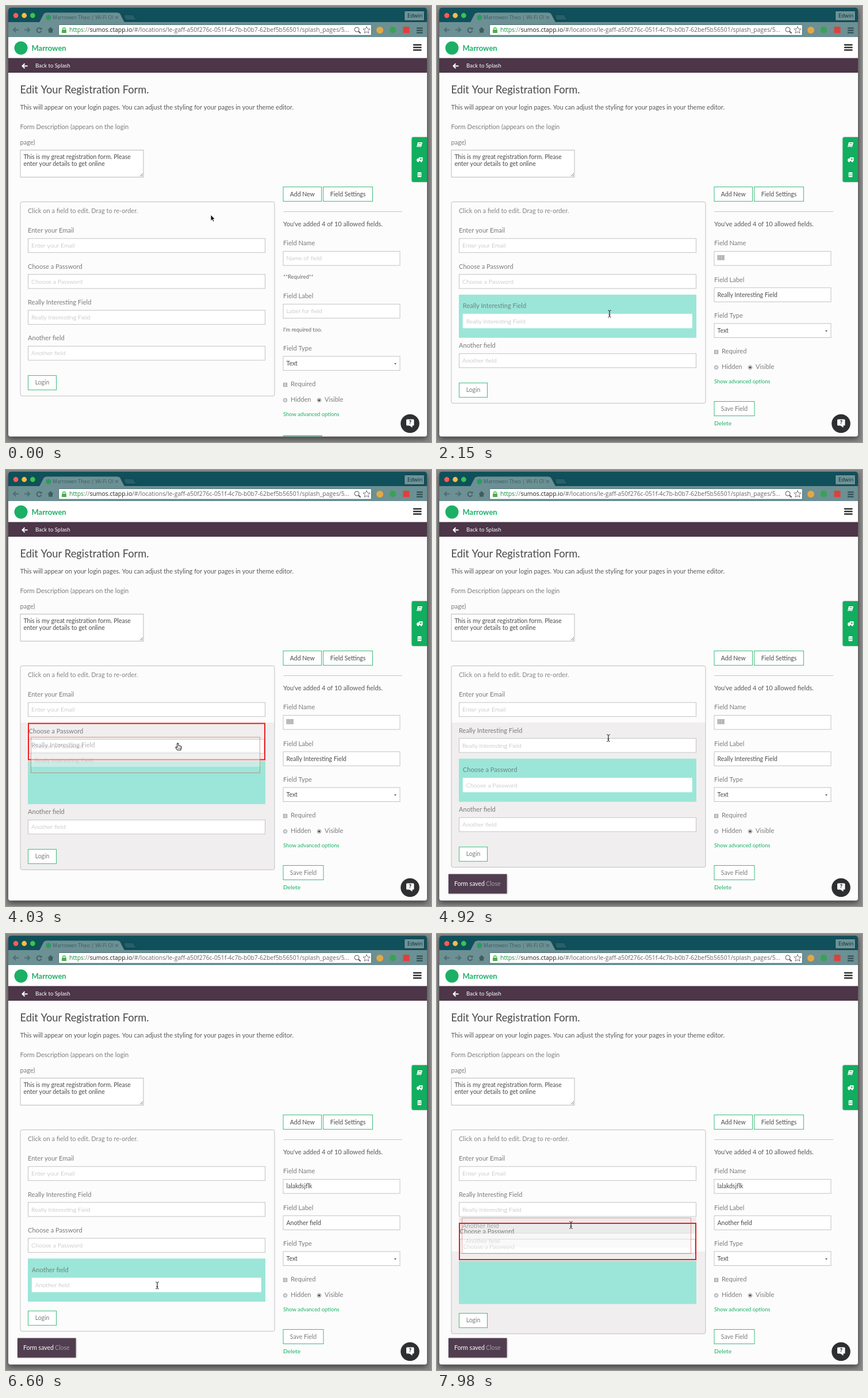
These frames come from a looping animation (739 px wide and 758 px high, 8000 ms). An HTML page with a canvas:

```html
<!DOCTYPE html>
<html lang="en">
<head>
<meta charset="utf-8">
<title>Edit Your Registration Form</title>
<style>
html, body { margin: 0; width: 100%; height: 100%; overflow: hidden; background: #898989; }
canvas { display: block; width: 739px; height: 758px; }
</style>
</head>
<body>
<canvas id="stage" width="739" height="758"></canvas>
<script>
const c = document.getElementById('stage').getContext('2d');
const LOOP = 8000;
const GREEN = '#1bb065', TEAL = '#9be6d8', PAGE = '#fcfcfc', GREY = '#f0eeee', PURPLE = '#4c3648';
const INK = '#4a4a4a', LABEL = '#7c7c7c', LINE = '#c2c2c2';
const LATO = 'Lato, sans-serif', SANS = '"Open Sans", sans-serif';

// Bursts of screen updates: first time, last time, number of steps
const bursts = [[750, 1550, 6], [2150, 2300, 2], [3380, 4330, 7], [4480, 4620, 2],
  [4920, 4920, 1], [5670, 6300, 5], [6600, 7530, 7], [7680, 7980, 3]];
// Pointer path: time, x, y
const path = [[0, 356, 364], [600, 356, 364], [1000, 345, 410], [1550, 300, 535], [3538, 300, 535],
  [4013, 300, 481], [4330, 298, 466], [5512, 298, 466], [6142, 263, 611], [6910, 263, 611],
  [7530, 250, 565], [7980, 233, 506]];

function snap(t) {
  let s = 0;
  for (const [a, b, n] of bursts) {
    if (t < a) break;
    const step = (b - a) / (n - 1) || 1;
    s = Math.min(b, a + Math.floor((t - a) / step + 1e-6) * step);
  }
  return s;
}

function pointerAt(t) {
  const i = path.findIndex(p => p[0] > t);
  if (i < 0) return path[path.length - 1].slice(1);
  const [t0, x0, y0] = path[i - 1], [t1, x1, y1] = path[i];
  const k = (t - t0) / (t1 - t0);
  return [x0 + (x1 - x0) * k, y0 + (y1 - y0) * k];
}

function text(s, x, y, size, color, weight = 400, family = LATO) {
  c.font = `${weight} ${size}px ${family}`;
  c.fillStyle = color;
  c.textBaseline = 'alphabetic';
  c.fillText(s, x, y + size * 0.34);
  return x + c.measureText(s).width;
}

function rect(x, y, w, h, fill) {
  c.fillStyle = fill;
  c.fillRect(x, y, w, h);
}

function frame(x, y, w, h, color, fill, width = 1) {
  if (fill) rect(x, y, w, h, fill);
  c.strokeStyle = color;
  c.lineWidth = width;
  c.strokeRect(x + width / 2, y + width / 2, w - width, h - width);
}

function round(x, y, w, h, r, fill, stroke) {
  c.beginPath();
  c.roundRect(x, y, w, h, r);
  if (fill) { c.fillStyle = fill; c.fill(); }
  if (stroke) { c.strokeStyle = stroke; c.lineWidth = 1; c.stroke(); }
}

function disc(x, y, r, fill, stroke) {
  c.beginPath();
  c.arc(x, y, r, 0, 7);
  if (fill) { c.fillStyle = fill; c.fill(); }
  if (stroke) { c.strokeStyle = stroke; c.lineWidth = 1; c.stroke(); }
}

function poly(points, fill, stroke, width = 1, close = true) {
  c.beginPath();
  points.forEach(([x, y]) => c.lineTo(x, y));
  if (close) c.closePath();
  if (fill) { c.fillStyle = fill; c.fill(); }
  if (stroke) { c.strokeStyle = stroke; c.lineWidth = width; c.stroke(); }
}

function at(x, y, fn) {
  c.save();
  c.translate(x, y);
  fn();
  c.restore();
}

function navArrow(x, y, dir, color) {
  at(x, y, () => {
    c.scale(dir, 1);
    poly([[5, 0], [-4, 0]], null, color, 2, false);
    poly([[0, -4], [-4, 0], [0, 4]], null, color, 2, false);
  });
}

function bars(x, y, w, gap, h, color) {
  for (let i = 0; i < 3; i++) rect(x, y + i * gap, w, h, color);
}

function browser() {
  rect(0, 0, 739, 758, '#898989');
  c.save();
  c.shadowColor = 'rgba(0,0,0,.55)';
  c.shadowBlur = 10;
  c.shadowOffsetY = 4;
  round(4, 3, 728, 745.5, 4, PAGE);
  c.restore();
  round(4, 3, 728, 30, [4, 4, 0, 0], '#10505a');
  rect(4, 28, 728, 26, '#6c9093');
  poly([[58, 28.5], [66, 13], [70, 11.5], [194, 11.5], [198, 13], [206, 28.5]], '#6c9093');
  poly([[208, 24.5], [204, 15], [221, 15], [227, 24.5]], '#285f68', '#0c4049');
  ['#fc5b57', '#fdbc40', '#34c84a'].forEach((col, i) => disc(17 + i * 14.7, 16.5, 4.4, col));
  disc(74, 20, 4.5, '#2c9a62');
  c.save();
  c.beginPath();
  c.rect(80, 12, 106, 16);
  c.clip();
  text('Marrowen Theo | Wi-Fi ON', 81, 20, 8.8, '#3a5e63', 400, SANS);
  c.restore();
  poly([[190, 17.5], [195, 22.5]], null, '#31565b', 1, false);
  poly([[195, 17.5], [190, 22.5]], null, '#31565b', 1, false);
  round(692.5, 8.5, 35, 17, 2, '#6c9297', '#0b3c44');
  text('Edwin', 698, 16.5, 9.3, '#102e33', 400, SANS);

  navArrow(17, 41.5, 1, '#4d6c70');
  navArrow(37, 41.5, -1, '#4d6c70');
  c.strokeStyle = '#3f5d61';
  c.lineWidth = 1.7;
  c.beginPath();
  c.arc(57.5, 42, 3.9, 0.3, 5.4);
  c.stroke();
  poly([[58.5, 41], [62.5, 41], [62.5, 37]], '#3f5d61');
  poly([[72, 42], [77.5, 36.5], [83, 42], [81, 42], [81, 46.5], [74, 46.5], [74, 42]], '#3f5d61');
  round(91.5, 32.5, 544, 18.5, 2, '#fff', '#4f7377');

  round(97, 41, 8, 6, 1, '#4bb24a');
  c.strokeStyle = '#4bb24a';
  c.lineWidth = 1.4;
  c.beginPath();
  c.arc(101, 40.5, 2.5, Math.PI, 0);
  c.stroke();
  let x = text('https', 110, 41.5, 10.4, '#168a3c', 400, SANS);
  x = text('://', x, 41.5, 10.4, '#777', 400, SANS);
  x = text('sumos.ctapp.io', x, 41.5, 10.4, '#222', 400, SANS);
  text('/#/locations/le-gaff-a50f276c-051f-4c7b-b0b7-62bef5b56501/splash_pages/5...', x, 41.5, 10.4, '#666', 400, SANS);
  disc(610, 41, 4, null, '#555');
  poly([[613, 44], [616.5, 47.5]], null, '#555', 1.8, false);
  const star = [...Array(10)].map((_, i) => {
    const r = i % 2 ? 2.8 : 6.5, a = i * Math.PI / 5;
    return [627 + r * Math.sin(a), 42 - r * Math.cos(a)];
  });
  poly(star, '#fff', '#777');
  disc(650, 42, 6, '#e5a743');
  disc(672.5, 41.5, 5.5, '#35a451');
  rect(690.5, 36, 11, 11, '#e0403b');
  bars(714, 37.5, 10.5, 4, 2, '#294a4e');
}

function header() {
  rect(4, 54, 728, 36.5, '#fff');
  disc(26, 73, 11.5, GREEN);
  text('Marrowen', 44.5, 74, 13, GREEN, 700);
  bars(708, 66.3, 14.5, 4.5, 2.5, '#2d2d2d');
  rect(4, 90.5, 728, 25.5, PURPLE);
  navArrow(32.5, 104.3, 1, '#fff');
  text('Back to Splash', 51, 104, 9.5, '#fff');
  text('Edit Your Registration Form.', 24.5, 146, 18.3, INK);
  text('This will appear on your login pages. You can adjust the styling for your pages in your theme editor.', 24.5, 176.5, 11, '#585858');
  text('Form Description (appears on the login', 24.5, 210, 11.1, LABEL);
  text('page)', 24.5, 237, 11.1, LABEL);
  frame(24.5, 250, 215, 48, '#b9b9b9', '#fff');
  text('This is my great registration form. Please', 30.5, 262, 10.5, INK);
  text('enter your details to get online', 30.5, 274.3, 10.5, INK);
  poly([[233, 296], [238, 291]], null, '#777', 1, false);
  poly([[236, 296], [238, 294]], null, '#777', 1, false);
}

function sideTab() {
  c.save();
  c.shadowColor = 'rgba(0,0,0,.3)';
  c.shadowBlur = 3;
  round(705.5, 228, 26.5, 78, [3, 0, 0, 3], '#10ae5e');
  c.restore();
  poly([[716, 237], [724, 237], [722, 245], [714, 245]], '#fff');
  poly([[717, 239.5], [722, 239.5]], null, '#10ae5e', 1, false);
  poly([[715, 243.3], [721.5, 243.3]], null, '#10ae5e', 0.8, false);
  rect(718, 263, 6.5, 6.5, '#fff');
  poly([[714, 269.5], [714, 267], [715.5, 265], [718, 265], [718, 269.5]], '#fff');
  disc(716.5, 270, 1.5, '#fff');
  disc(722, 270, 1.5, '#fff');
  rect(720.7, 264.2, 1, 4, '#10ae5e');
  rect(719.2, 265.7, 4, 1, '#10ae5e');
  round(715.5, 289, 7, 8.5, 1.5, '#fff');
  rect(715.5, 291.5, 7, 0.8, '#10ae5e');
  rect(715.5, 294, 7, 0.8, '#10ae5e');
}

function button(s, x, y, w, color = INK) {
  frame(x, y, w, 26, '#3dbb7b', '#fff');
  c.textAlign = 'center';
  text(s, x + w / 2, y + 13, 10.45, color);
  c.textAlign = 'left';
}

function input(x, y, w, hint, value) {
  frame(x, y, w, 25.5, LINE, '#fff');
  if (value) text(value, x + 6, y + 12.8, 10.5, INK);
  else text(hint, x + 6, y + 12.8, 10.6, '#aaa', 300);
}

function settings(name, label) {
  button('Add New', 481.5, 314, 67.5);
  button('Field Settings', 551, 314, 87);
  rect(482, 357, 207, 1, '#c4c4c4');
  text("You've added 4 of 10 allowed fields.", 482, 379.5, 11, '#585858');
  text('Field Name', 482, 412.5, 11.1, LABEL);
  input(481.5, 426, 204, 'Name of field', name);
  const up = name ? 28.5 : 0, d = up * 2;
  if (!name) {
    text('**Required**', 482, 471, 9.4, '#666');
    text("I'm required too.", 482, 563, 9.4, '#666');
  }
  text('Field Label', 482, 504.5 - up, 11.1, LABEL);
  input(481.5, 517.8 - up, 204, 'Label for field', label);
  text('Field Type', 482, 595.3 - d, 11.1, LABEL);
  input(481.5, 608.5 - d, 204, '', 'Text');
  poly([[675, 621 - d], [679, 621 - d], [677, 623.3 - d]], '#444');
  frame(482, 655 - d, 7, 7, '#999', '#ddd');
  rect(483, 658 - d, 5, 1, '#aaa');
  text('Required', 495, 657.7 - d, 11.1, LABEL);
  disc(485.5, 685.3 - d, 3.2, '#ddd', '#999');
  text('Hidden', 495, 684.5 - d, 11.1, LABEL);
  disc(544.5, 685.3 - d, 3.2, '#e8e8e8', '#888');
  disc(544.5, 685.3 - d, 1.6, '#333');
  text('Visible', 554, 684.5 - d, 11.1, LABEL);
  text('Show advanced options', 482, 709.5 - d, 9.4, GREEN);
  if (name) {
    button('Save Field', 481.5, 687, 71, LABEL);
    text('Delete', 482, 725.5, 10.3, GREEN);
  } else {
    rect(481.5, 746.5, 68.5, 1.5, '#3dbb7b');
  }
}

function ghost(name, y) {
  c.save();
  c.globalAlpha = 0.5;
  rect(43, y + 26.5, 399, 25.5, '#f6f4f4');
  frame(43, y, 399, 63, '#e23b3b');
  rect(44, y + 26.5, 397, 0.8, LINE);
  text(name, 44, y + 14, 11.1, '#666');
  text(name, 50, y + 40, 10.5, '#8a8a8a', 300);
  c.restore();
}

function form(order, sel, drag, over, grey, top) {
  const extra = (sel < 0 ? 0 : 12.7) + (over < 0 ? 0 : 4.3);
  round(25, 340.5, 442, 337.5 + extra, 3, PAGE);
  if (grey) round(25, grey, 442, 678 + extra - grey, [0, 0, 3, 3], GREY);
  if (drag) rect(38, top, 413, 28, '#ecebeb');
  round(25, 340.5, 442, 337.5 + extra, 3, null, '#bfbfbf');
  text('Click on a field to edit. Drag to re-order.', 38, 356.5, 11, '#858585');
  let y = 376.7;
  order.forEach((name, i) => {
    if (i === sel) {
      rect(38, y + 0.3, 413, 75, TEAL);
      if (!drag) {
        text(name, 44.8, y + 20, 11.1, '#6d8380');
        rect(44.8, y + 33.7, 399, 25, '#fff');
        text(name, 50.8, y + 46.5, 10.6, '#aaa', 300);
      }
      y += 75.3;
    } else {
      const o = i === over ? 1.6 : 0;
      text(name, 38 + o, y + 13.8 + o, 11.1, LABEL);
      input(38 + o, y + 27 + o, 413 - 2 * o, name);
      if (o) frame(38, y + 0.5, 413, 65, '#ee1c1c', null, 2);
      y += o ? 66.5 : 62.4;
    }
  });
  button('Login', 38, y + 15.6, 50, LABEL);
  if (drag) ghost(order[sel], top);
}

function help() {
  disc(702.5, 726, 16.3, '#2e2f31');
  round(696, 718.5, 13.5, 11, 1.5, '#fff');
  poly([[701, 729], [706.5, 729], [706.5, 733]], '#fff');
  c.textAlign = 'center';
  text('?', 702.8, 724.2, 9.5, '#2e2f31', 900);
  c.textAlign = 'left';
}

function toast() {
  c.save();
  c.shadowColor = 'rgba(0,0,0,.3)';
  c.shadowBlur = 3;
  rect(20, 702.5, 101.5, 34, '#513d50');
  c.restore();
  text('Form saved', 30, 719, 10.5, '#fff');
  text('Close', 85, 719, 10.5, '#a99fa8');
}

function beam(x, y) {
  const arm = s => poly([[x - 2.8, y + 6 * s], [x - 1, y + 5.7 * s], [x, y + 4.5 * s],
    [x + 1, y + 5.7 * s], [x + 2.8, y + 6 * s]], null, '#222', 1, false);
  poly([[x, y - 5], [x, y + 5]], null, '#222', 1.2, false);
  arm(1);
  arm(-1);
  poly([[x - 1.6, y + 2], [x + 1.6, y + 2]], null, '#222', 1, false);
}

function arrow(x, y) {
  poly([[x, y - 1], [x, y + 9.5], [x + 2.4, y + 7.3], [x + 4.2, y + 11], [x + 6, y + 10.1],
    [x + 4.3, y + 6.7], [x + 7.2, y + 6.5]], '#111', '#fff', 0.8);
}

function hand(x, y) {
  poly([[x - 2.4, y - 5.5], [x - 1, y - 6], [x, y - 5], [x, y - 1.8], [x + 4.5, y - 0.8],
    [x + 5, y + 1], [x + 3.8, y + 6], [x - 2, y + 6], [x - 5, y + 1.8], [x - 4.5, y + 0.4],
    [x - 2.4, y + 1.4]], '#fff', '#222', 1.1);
  for (let i = 0; i < 3; i++) rect(x - 0.8 + i * 1.8, y + 1.5, 0.7, 3, '#444');
}

function draw(time) {
  const t = snap(time), [x, y] = pointerAt(t);
  const swapped = t >= 4480, second = t >= 6300;
  const drag1 = t >= 3690 && !swapped, drag2 = t >= 7060;
  const over = drag1 && y < 505 ? 1 : drag2 && y < 566 ? 2 : -1;
  const sel = t < 2150 ? -1 : second ? 3 : 2;
  const grey = over === 1 || (swapped && t < 5670) ? 439 : over === 2 ? 552 : 0;
  const fields = ['Choose a Password', 'Really Interesting Field'];
  if (swapped) fields.reverse();

  browser();
  header();
  settings(sel < 0 ? '' : second ? 'lalakdsjflk' : 'lllll',
    sel < 0 ? '' : second ? 'Another field' : 'Really Interesting Field');
  form(['Enter your Email', ...fields, 'Another field'], sel, drag1 || drag2, over, grey, y - (drag1 ? 17 : 13));
  sideTab();
  if (t >= 4920) toast();
  help();
  if (drag1) hand(x, y);
  else if (y < 400) arrow(x, y);
  else beam(x, y);
}

function tick() {
  draw(performance.now() % LOOP);
  requestAnimationFrame(tick);
}
tick();
</script>
</body>
</html>
```
